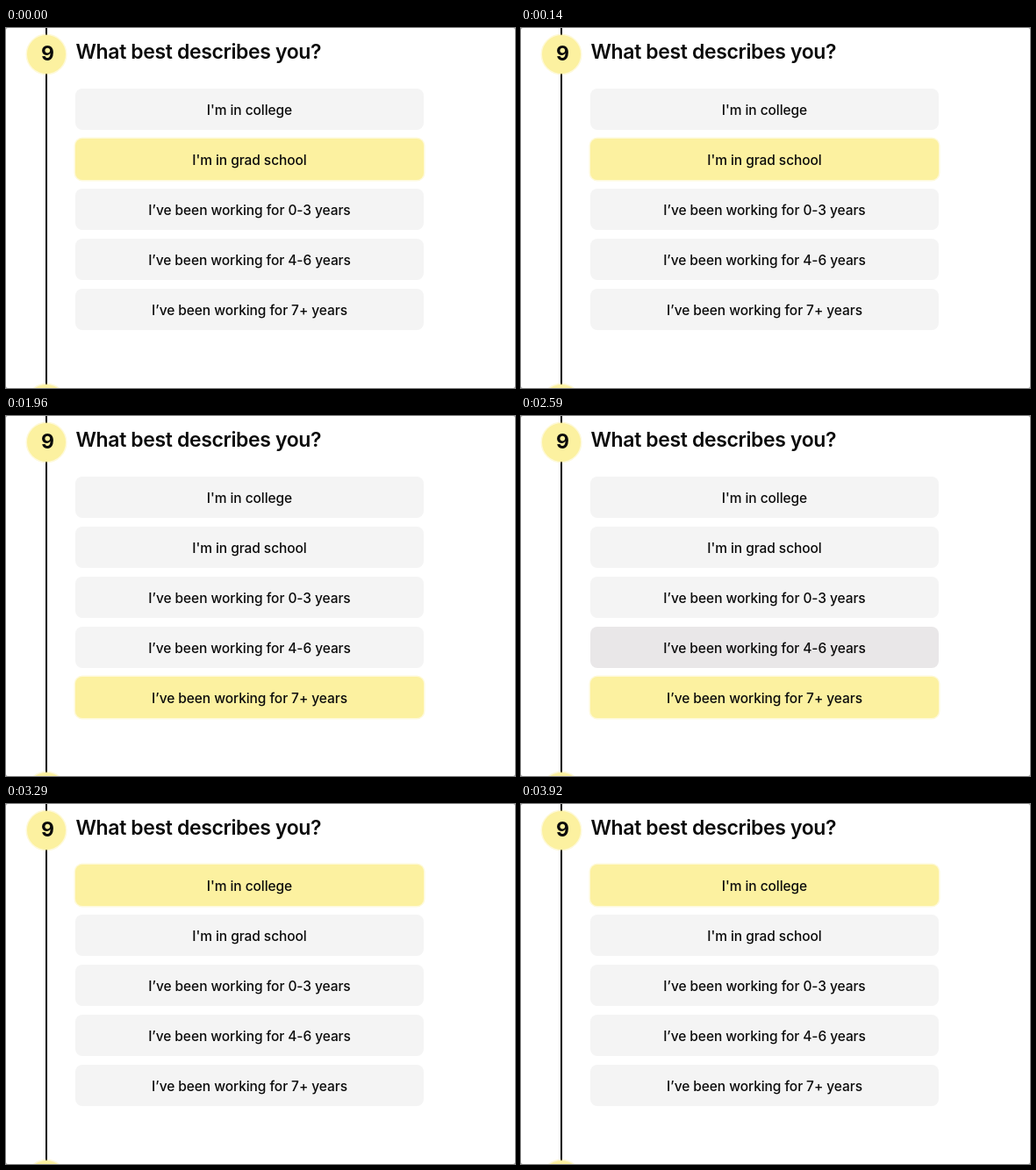
An HTML page for the animation above (4270 ms loop, 580x410 px).

```html
<!DOCTYPE html>
<html lang="en">
<head>
<meta charset="utf-8">
<title>Survey question</title>
<style>
  :root { --idle: #f4f4f4; --hover: #e9e7e8; --picked: #fcf1a0; --glow: #fcf1a066; }
  html, body { margin: 0; width: 100%; height: 100%; overflow: hidden; background: #fff; }
  svg { display: block; width: 580px; height: 410px; }
  text { font-family: Inter, "Open Sans", sans-serif; fill: #0b0b0b; }
  .title { font-size: 23px; font-weight: 600; letter-spacing: -.37px; }
  .number { font-size: 23px; font-weight: 650; text-anchor: middle; }
  .badge { fill: var(--picked); stroke: var(--glow); stroke-width: 3; paint-order: stroke; }
  .option text { font-size: 15.5px; font-weight: 450; text-anchor: middle; letter-spacing: -.07px; }
  .option rect {
    fill: var(--idle);
    stroke: transparent;
    stroke-width: 3;
    paint-order: stroke;
    animation: 4270ms step-end infinite;
  }

  #college rect { animation-name: college; }
  #grad rect { animation-name: grad; }
  #early rect { animation-name: early; }
  #middle rect { animation-name: middle; }
  #senior rect { animation-name: senior; }

  /* The pointer picks the last option, sweeps up to the first, then leaves downwards. */
  @keyframes college {
    0% { fill: var(--idle); stroke: transparent; }
    67.21% { fill: var(--hover); }
    77.04%, 100% { fill: var(--picked); stroke: var(--glow); }
  }
  @keyframes grad {
    0% { fill: var(--picked); stroke: var(--glow); }
    45.9% { fill: var(--idle); stroke: transparent; }
    63.93% { fill: var(--hover); }
    67.21% { fill: var(--idle); }
    85.24% { fill: var(--hover); }
    86.88%, 100% { fill: var(--idle); stroke: transparent; }
  }
  @keyframes early {
    0% { fill: var(--idle); }
    62.29% { fill: var(--hover); }
    63.93% { fill: var(--idle); }
    86.88% { fill: var(--hover); }
    88.52%, 100% { fill: var(--idle); }
  }
  @keyframes middle {
    0% { fill: var(--idle); }
    59.01% { fill: var(--hover); }
    62.29% { fill: var(--idle); }
    88.52% { fill: var(--hover); }
    90.16%, 100% { fill: var(--idle); }
  }
  @keyframes senior {
    0% { fill: var(--idle); stroke: transparent; }
    42.62% { fill: var(--hover); }
    45.9% { fill: var(--picked); stroke: var(--glow); }
    77.04% { fill: var(--idle); stroke: transparent; }
    90.16% { fill: var(--hover); }
    91.8%, 100% { fill: var(--idle); stroke: transparent; }
  }
</style>
</head>
<body>
<svg viewBox="0 0 580 410">
  <rect width="580" height="410" fill="#999"/>
  <rect width="580" height="410" rx="2" fill="#fff"/>
  <path d="M46 0V410" stroke="#000" stroke-width="2"/>
  <circle class="badge" cx="46" cy="30" r="22"/>
  <circle class="badge" cx="46" cy="428" r="22"/>
  <text class="number" x="47.5" y="37">9</text>
  <text class="title" x="79.5" y="35">What best describes you?</text>

  <g class="option" id="college">
    <rect x="79" y="69" width="397" height="47" rx="8"/>
    <text x="277.5" y="99">I'm in college</text>
  </g>
  <g class="option" id="grad">
    <rect x="79" y="126" width="397" height="47" rx="8"/>
    <text x="277.5" y="156">I'm in grad school</text>
  </g>
  <g class="option" id="early">
    <rect x="79" y="183" width="397" height="47" rx="8"/>
    <text x="277.5" y="213">I’ve been working for 0-3 years</text>
  </g>
  <g class="option" id="middle">
    <rect x="79" y="240" width="397" height="47" rx="8"/>
    <text x="277.5" y="270">I’ve been working for 4-6 years</text>
  </g>
  <g class="option" id="senior">
    <rect x="79" y="297" width="397" height="47" rx="8"/>
    <text x="277.5" y="327">I’ve been working for 7+ years</text>
  </g>
</svg>
</body>
</html>
```
